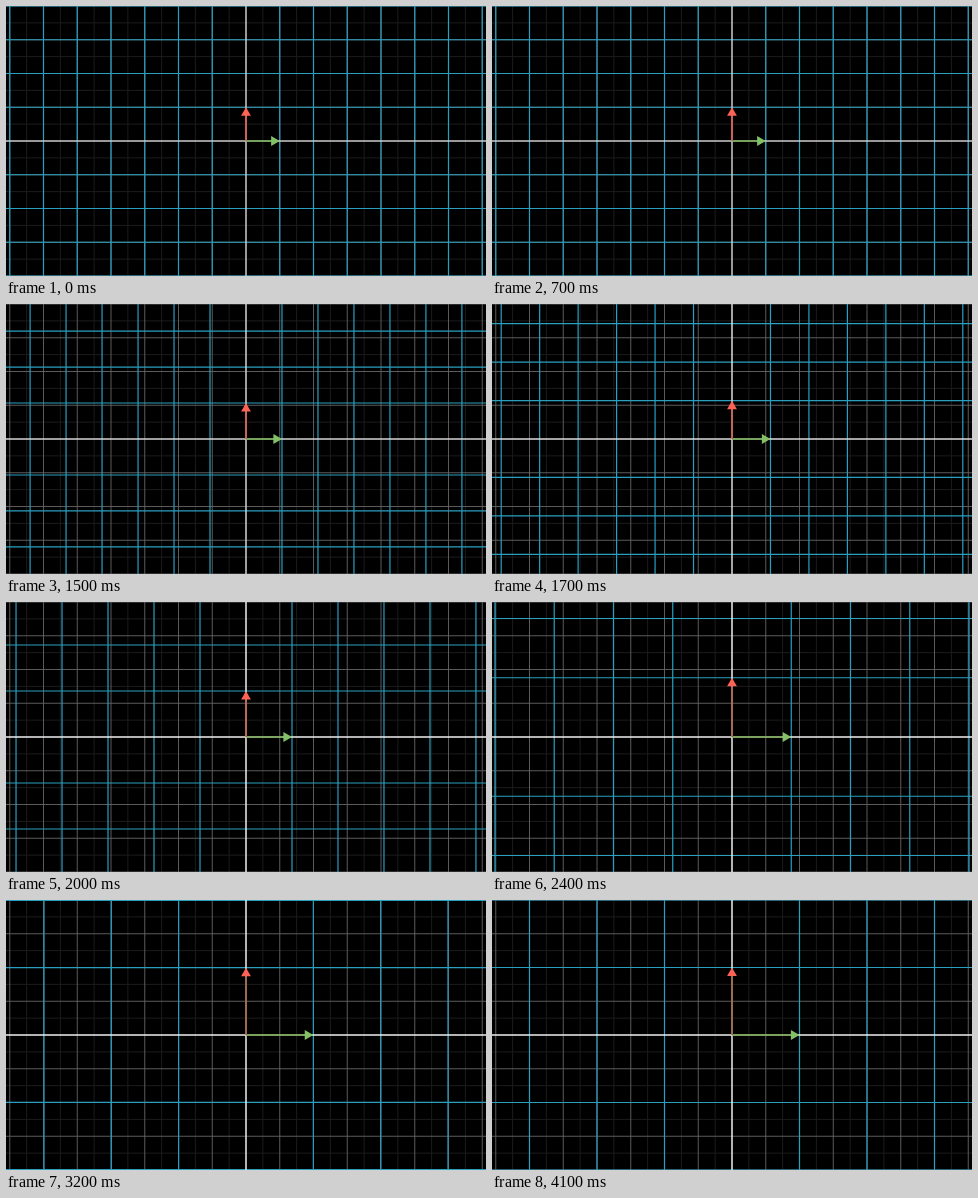
Write an HTML page with a canvas that moves like this. It is 480 by 270 pixels and loops after 4.2 s.

```html
<!DOCTYPE html>
<html lang="en">
<head>
<meta charset="utf-8">
<title>Scaling the plane</title>
<style>
  html, body { margin: 0; width: 100%; height: 100%; overflow: hidden; background: #000; }
  canvas { display: block; width: 480px; height: 270px; }
</style>
</head>
<body>
<canvas id="stage" width="480" height="270"></canvas>
<script>
const ctx = document.getElementById('stage').getContext('2d');
const W = 480, H = 270, CX = W / 2, CY = H / 2;
const UNIT = 33.75;
const LOOP = 4200, STEP = 100;

const sigmoid = x => 1 / (1 + Math.exp(-x));
const clamp = x => Math.min(1, Math.max(0, x));

function smooth(t) {
  const edge = sigmoid(-5);
  return clamp((sigmoid(10 * (t - 0.5)) - edge) / (1 - 2 * edge));
}

// The scaling runs on 90 ticks, sampled 3.75 ticks per displayed step.
function progress(ms) {
  const step = Math.floor((ms % LOOP) / STEP);
  return smooth(clamp(Math.floor(3.75 * step - 34.15) / 90));
}

function mix(a, b, t) {
  return `rgb(${a.map((v, i) => Math.round(v + (b[i] - v) * t)).join(',')})`;
}

function line(x1, y1, x2, y2) {
  ctx.beginPath();
  ctx.moveTo(x1, y1);
  ctx.lineTo(x2, y2);
  ctx.stroke();
}

function grid(spacing, color, width, offset = 0) {
  ctx.strokeStyle = color;
  ctx.lineWidth = width;
  for (let d = offset || spacing; d <= CX; d += spacing) {
    for (const p of [-d, d]) {
      line(CX + p, 0, CX + p, H);
      if (d <= CY) line(0, CY + p, W, CY + p);
    }
  }
}

function axes(color) {
  ctx.strokeStyle = color;
  ctx.lineWidth = 1.5;
  line(0, CY, W, CY);
  line(CX, 0, CX, H);
}

function arrow(length, angle, shaft, tip) {
  const head = 8.6, half = 4.9;
  ctx.save();
  ctx.translate(CX, CY);
  ctx.rotate(angle);
  ctx.strokeStyle = shaft;
  ctx.lineWidth = 1.6;
  line(0, 0, length - head, 0);
  ctx.fillStyle = tip;
  ctx.beginPath();
  ctx.moveTo(length, 0);
  ctx.lineTo(length - head, -half);
  ctx.lineTo(length - head, half);
  ctx.fill();
  ctx.restore();
}

function draw(ms) {
  const s = progress(ms);
  const size = UNIT * (1 + s);
  ctx.fillStyle = '#000';
  ctx.fillRect(0, 0, W, H);
  grid(UNIT, '#1c1c1c', 1, UNIT / 2);
  grid(UNIT, '#666', 0.9);
  grid(size, '#29a0c0', 1.2);
  axes(mix([205, 205, 205], [240, 240, 240], clamp(s * 3)));
  arrow(size, 0, mix([111, 165, 80], [108, 155, 65], s), '#83c167');
  arrow(size, -Math.PI / 2, mix([215, 85, 74], [150, 88, 55], s), '#fc6255');
}

function tick() {
  draw(performance.now());
  requestAnimationFrame(tick);
}
tick();
</script>
</body>
</html>
```
